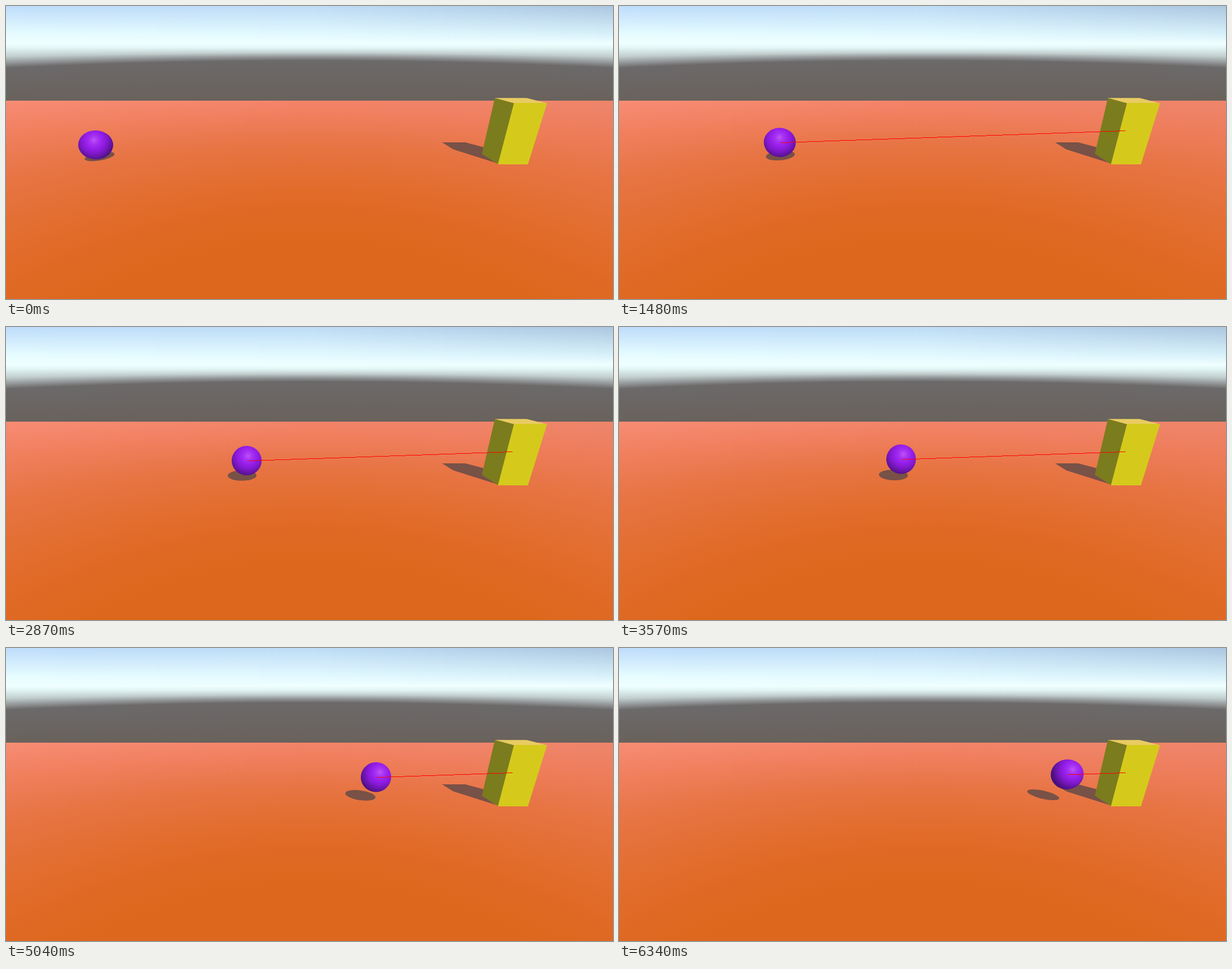
Write an HTML page with a canvas that moves like this. It is 1076x520 px and loops after 6.37 s.

```html
<!DOCTYPE html>
<html lang="en">
<head>
<meta charset="utf-8">
<title>Ball moving to a box</title>
<style>
html, body { margin: 0; width: 100%; height: 100%; overflow: hidden; background: #dd671d; }
canvas { display: block; width: 100vw; height: 100vh; }
</style>
</head>
<body>
<canvas id="stage" width="1076" height="520"></canvas>
<script>
const W = 1076, H = 520, LOOP = 6370, HOLD = 270, EDGE = 168;
const SHADOW = 'rgb(120,81,71)';
const ctx = document.getElementById('stage').getContext('2d');

const lerp = (a, b, k) => a + (b - a) * k;
const mix = (a, b, k) => a.map((v, i) => lerp(v, b[i], k));
const rgb = c => `rgb(${c.map(Math.round).join()})`;

// Colour at x between a left, a middle and a right tone.
function across(x, left, mid, right) {
  const k = x / W * 2;
  return k < 1 ? mix(left, mid, k) : mix(mid, right, k - 1);
}

// Vertical gradient strip; stops are [y, colour].
function strip(g, x, w, y0, y1, stops) {
  const end = stops[stops.length - 1][0];
  const grad = g.createLinearGradient(0, y0, 0, end);
  for (const [y, c] of stops) grad.addColorStop((y - y0) / (end - y0), rgb(c));
  g.fillStyle = grad;
  g.fillRect(x, y0, w, y1 - y0);
}

function drawBackdrop(g) {
  const step = 2;
  for (let x = 0; x < W; x += step) {
    const bend = (x / W * 2 - 1) ** 2;
    const drop = 13 * bend;
    strip(g, x, step, 0, EDGE, [
      [0, across(x, [190, 220, 251], [190, 220, 246], [171, 198, 224])],
      [50, across(x, [230, 252, 255], [226, 249, 255], [216, 241, 250])],
      [67, [240, 255, 255]],
      [75, [225, 244, 244]],
      [83 + drop * 0.5, [194, 206, 206]],
      [90 + drop * 0.85, [146, 150, 151]],
      [97 + drop, [108, 105, 106]],
      [EDGE, [105, 98, 92]]
    ]);
    const top = across(x, [247, 140, 116], [243, 132, 105], [238, 133, 107]);
    const depth = d => EDGE + d * (1 + 0.75 * bend);
    strip(g, x, step, EDGE, H, [
      [EDGE, top],
      [depth(34), mix(top, [237, 122, 84], 0.7)],
      [depth(80), [231, 116, 67]],
      [depth(165), [225, 107, 40]],
      [depth(250), [221, 103, 28]]
    ]);
  }
}

function poly(g, color, ...p) {
  g.fillStyle = color;
  g.beginPath();
  for (let i = 0; i < p.length; i += 2) g.lineTo(p[i], p[i + 1]);
  g.fill();
}

function drawBox(g) {
  poly(g, SHADOW, 773, 242, 814, 242, 852, 252, 872, 279.5, 793, 254.5);
  poly(g, '#7b7c1d', 866.5, 163.5, 901, 172, 873, 281, 843.5, 262.5);
  poly(g, '#e9cb62', 866.5, 163.3, 923, 163.3, 959, 172.5, 900.5, 172.5);
  poly(g, '#d5ca1c', 900.5, 172, 959.2, 172.3, 925.2, 281, 872, 281);
}

const backdrop = document.createElement('canvas');
backdrop.width = W;
backdrop.height = H;
drawBackdrop(backdrop.getContext('2d'));
drawBox(backdrop.getContext('2d'));

// Near-constant speed through a few [time, x] points.
const PATH = [[HOLD, 165], [840, 222.5], [2060, 341.5], [4180, 564], [6340, 794.5]];

function ballX(t) {
  if (t < HOLD) return 159;
  const i = Math.max(1, PATH.findIndex(p => p[0] >= t));
  const last = t > PATH[PATH.length - 1][0] ? PATH.length - 1 : i;
  const [t0, x0] = PATH[last - 1], [t1, x1] = PATH[last];
  return lerp(x0, x1, Math.min(1, (t - t0) / (t1 - t0)));
}

function ellipse(x, y, rx, ry, turn, fill) {
  ctx.fillStyle = fill;
  ctx.beginPath();
  ctx.ellipse(x, y, rx, ry, turn, 0, Math.PI * 2);
  ctx.fill();
}

// k is the progress of the ball, 0 to 1; arc peaks halfway.
function drawShadow(k) {
  const arc = 4 * k * (1 - k);
  ellipse(
    lerp(166, 752, k) + 6 * arc,
    lerp(267, 260.5, k) - 0.7 * arc,
    25.3 + 9 * (k - 0.4) ** 2 + 0.5 * k,
    7.2 + 2.1 * arc,
    lerp(-10, 13, k) * Math.PI / 180,
    SHADOW
  );
}

// The wide lens stretches the ball away from the middle of the stage.
function drawBall(x, y, k) {
  const r = 25.7 + 0.9 * k;
  const dx = x - W / 2, dy = y - H / 2;
  const hx = x + lerp(-3, 10, k), hy = y - 8.5;
  const shine = ctx.createRadialGradient(hx, hy, 0, hx, hy, 38);
  ['#c052f6', '#a632f2', '#981fec', '#8419d0', '#6614a6', '#490f7c']
    .forEach((c, i, all) => shine.addColorStop(i / (all.length - 1), c));
  ellipse(x, y, r * Math.hypot(1, dx / 560), r, Math.atan(dy / dx), shine);
}

// Thin hard-edged line, one pixel per column.
function drawRay(x0, y0, x1, y1) {
  ctx.fillStyle = '#f00';
  for (let x = Math.round(x0); x <= x1; x++) {
    ctx.fillRect(x, Math.floor(lerp(y0, y1, (x - x0) / (x1 - x0))), 1, 1);
  }
}

function render(t) {
  const x = ballX(t);
  const k = (x - 159) / 635.5;
  const y = lerp(246.5, 224.3, k);
  ctx.drawImage(backdrop, 0, 0);
  drawShadow(k);
  drawBall(x, y, k);
  if (t >= HOLD) drawRay(x + 1, y + 0.5, 897, 221.5);
}

const start = performance.now();
function loop() {
  render((performance.now() - start) % LOOP);
  requestAnimationFrame(loop);
}
loop();
</script>
</body>
</html>
```
